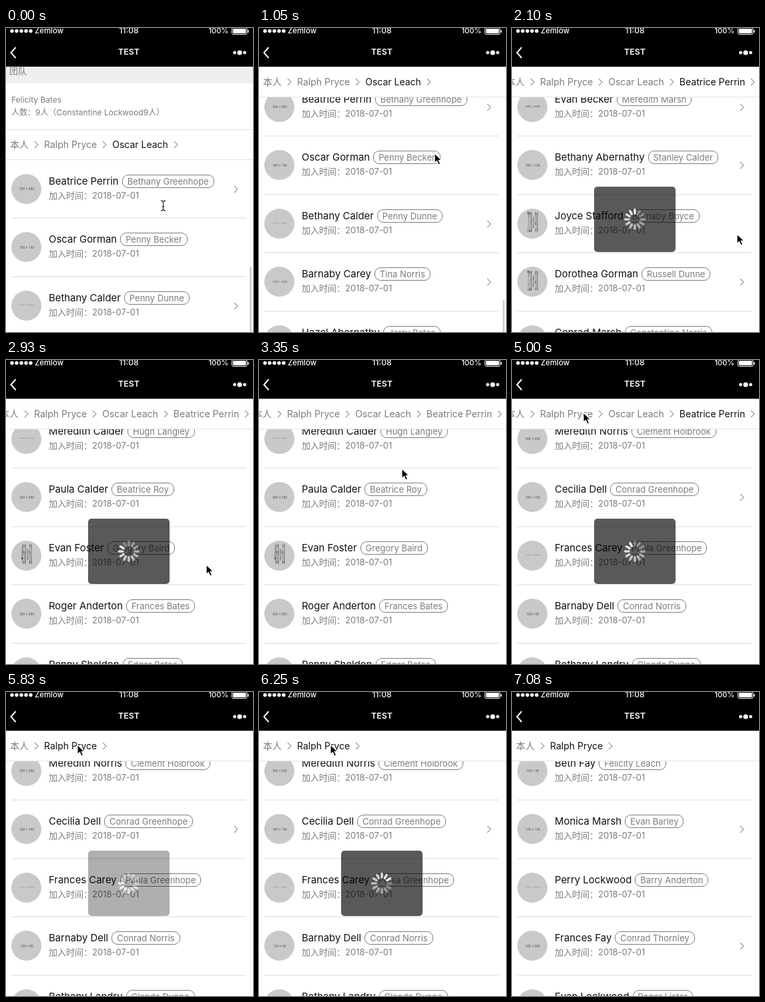
An HTML page for the animation above (7.5 s loop, 370x456 px).

```html
<!DOCTYPE html>
<html lang="zh-CN">
<head>
<meta charset="utf-8">
<style>
html, body { margin: 0; width: 100%; height: 100%; overflow: hidden; background: #fff; }
body { font-family: Inter, "Noto Sans CJK SC", "Noto Sans CJK JP", "Noto Sans CJK", sans-serif; color: #7c7c7c; }
#stage { position: relative; width: 370px; height: 456px; overflow: hidden; }
#stage div, #stage svg { position: absolute; box-sizing: border-box; white-space: nowrap; }
#stage .t { line-height: 20px; }
#page { left: 0; top: 0; width: 370px; height: 456px; }
#strip { left: 0; top: 40px; width: 370px; height: 43px; background: #efefef; }
#crumbs { left: 0; width: 370px; height: 46px; background: #fff; overflow: hidden;
  border-top: 1px solid #e3e3e3; border-bottom: 1px solid #e3e3e3; }
#path { left: 6px; top: 12px; display: flex; font-size: 14px; line-height: 20px; }
#stage #path svg { position: static; margin: 4px 8px 0; }
.on { color: #111; }
.row { left: 0; width: 370px; height: 87.5px; }
.rule { left: 8px; width: 351px; bottom: -1px; height: 2px; background: #ececec; }
.face { left: 8px; top: 21px; width: 45px; height: 45px; border-radius: 50%; overflow: hidden; background: #c9c9c9; }
.face div { left: 50%; top: 50%; font: 10px/12px Roboto, sans-serif; color: #555; }
.name { left: 64px; top: 22px; font-size: 14.9px; color: #111; }
.tag { display: inline-block; box-sizing: border-box; height: 20px; margin-left: 5px; padding: 0 7px;
  border: 1px solid #7c7c7c; border-radius: 9px; font-size: 13px; line-height: 18px; color: #7c7c7c; vertical-align: top; }
.date { left: 64px; top: 43px; font-size: 13px; }
#bar { left: 365px; width: 3px; height: 120px; border-radius: 2px; background: #d0d0d0; }
#toast { left: 123px; top: 238px; width: 122px; height: 98px; border-radius: 5px; background: rgba(0,0,0,.65); }
#head { left: 0; top: 0; }
</style>
</head>
<body>
<div id="stage">
  <div id="page">
    <div id="strip"></div>
    <div class="t" style="left:5px;top:54px;font-size:13px">团队</div>
    <div class="t" style="left:8px;top:98px;font-size:12px">Felicity Bates</div>
    <div class="t" style="left:8px;top:117px;font-size:12px">人数：9人（Constantine Lockwood9人）</div>
    <div id="list"></div>
  </div>
  <div id="crumbs"><div id="path"></div></div>
  <div id="bar"></div>
  <div id="toast"><svg id="spin" width="122" height="98" viewBox="-61 -49 122 98"></svg></div>
  <svg id="head" width="370" height="58" fill="#fff" font-weight="500">
    <rect width="370" height="58" fill="#000"/>
    <path d="M9 4.5H37.5" stroke="#fff" stroke-width="5.4" stroke-linecap="round" stroke-dasharray="0 7"/>
    <text x="43" y="8" font-size="11.4">Zemlow</text>
    <text x="184" y="8" font-size="12" text-anchor="middle">11:08</text>
    <text x="303.5" y="8" font-size="11">100%</text>
    <rect x="338.5" y="-.5" width="22.5" height="10" rx="2" fill="none" stroke="#fff"/>
    <rect x="340" y="1" width="19.5" height="7" rx="1"/>
    <rect x="362" y="3" width="1.6" height="4" rx=".8"/>
    <path d="M14.5 29L7.5 37L14.5 45" fill="none" stroke="#fff" stroke-width="2"/>
    <text x="184" y="40" font-size="12.4" font-weight="600" text-anchor="middle">TEST</text>
    <circle cx="342.5" cy="37" r="2.4"/><circle cx="350" cy="37" r="3.6"/><circle cx="357.5" cy="37" r="2.4"/>
  </svg>
  <svg id="arrow" width="16" height="22">
    <path d="M1 1V15.5L4.4 12.4L7 18L9.6 16.8L7.2 11.4H11.6Z" stroke="#fff" stroke-width="1.2"/>
  </svg>
  <svg id="beam" width="9" height="17" fill="none" stroke="#333" stroke-width="1.3">
    <path d="M1 1Q4.5 1 4.5 4V13Q4.5 16 1 16M8 1Q4.5 1 4.5 4V13Q4.5 16 8 16M3 10H6"/>
  </svg>
</div>
<script>
// The picture is held for one tick at a time; k counts ticks.
const LOOP = 7500, TICK = 208.1;
const SCROLL = 123, OVERFLOW = 15;
const $ = id => document.getElementById(id);
const clamp = v => Math.min(1, Math.max(0, v));

// person | tag | picture label | picture shape | has an arrow
const lists = [
  ["Beatrice Perrin|Bethany Greenhope|336 × 280||1", "Oscar Gorman|Penny Becker|180 × 150||",
   "Bethany Calder|Penny Dunne|160 × 600|line|1", "Barnaby Carey|Tina Norris|120 × 240|flat|1",
   "Hazel Abernathy|Jerry Bates|||"],
  ["Evan Becker|Meredith Marsh|240 × 400|flat|1", "Bethany Abernathy|Stanley Calder|180 × 150||1",
   "Joyce Stafford|Barnaby Boyce|728 × 90|tall|", "Dorothea Gorman|Russell Dunne|728 × 90|tall|1",
   "Conrad Marsh|Constantine Norris|||"],
  ["Meredith Calder|Hugh Langley|160 × 600|line|", "Paula Calder|Beatrice Roy|250 × 250||",
   "Evan Foster|Gregory Baird|468 × 60|tall|", "Roger Anderton|Frances Bates|336 × 280||",
   "Penny Sheldon|Edgar Bates|||"],
  ["Meredith Norris|Clement Holbrook|300 × 250||", "Cecilia Dell|Conrad Greenhope|180 × 150||1",
   "Frances Carey|Paula Greenhope|120 × 600|line|", "Barnaby Dell|Conrad Norris|120 × 90||",
   "Bethany Landry|Glenda Dunne|||"],
  ["Beth Fay|Felicity Leach|120 × 90||", "Monica Marsh|Evan Barley|125 × 125||1",
   "Perry Lockwood|Barry Anderton|160 × 600|line|", "Frances Fay|Conrad Thornley|336 × 280||1",
   "Evan Lockwood|Roger Lister|||"]
];
const shapes = { "": [.5, .5], flat: [.5, .36], line: [.5, .13], tall: [.42, 4.2] };
const people = ["本人", "Ralph Pryce", "Oscar Leach", "Beatrice Perrin"];

// Each click sets the trail, shows the loader for five ticks and swaps the list after three.
const clicks = [
  { k: 0, count: 3, active: 2 },
  { k: 7, count: 4, active: 3 },
  { k: 11, count: 4, active: -1 },
  { k: 21, count: 4, active: 3 },
  { k: 28, count: 2, active: 1 }
];
const loads = clicks.slice(1);
const loader = age => age < 0 || age > 4 ? 0 : age % 4 ? 1 : .48;

// Pointer stops: tick, x, y
const stops = [[3, 231, 258], [5, 262, 187], [7, 343, 117], [8, 343, 117], [10, 336, 308], [11, 342, 378],
  [13, 342, 378], [16, 213, 162], [19, 298, 80], [21, 125, 80], [22, 106, 78], [30, 106, 78], [33, 321, 423]];

function pointer(k) {
  const i = stops.findIndex(s => s[0] >= k);
  if (i < 1) return stops.at(i);
  const a = stops[i - 1], b = stops[i], p = (k - a[0]) / (b[0] - a[0]);
  return a.map((v, j) => v + (b[j] - v) * p);
}

const chevron = (style, color) => `<svg style="${style}" width="7" height="12" fill="none"
  stroke="${color}" stroke-width="1.1"><path d="M1 1L6 6L1 11"/></svg>`;

function row(text, i) {
  const [name, tag, label, shape, arrow] = text.split("|");
  return `<div class="row" style="top:${197.5 + 87.5 * i}px">
    <div class="face"><div style="transform:translate(-50%,-50%) scale(${shapes[shape]})">${label}</div></div>
    <div class="name t">${name}<span class="tag">${tag}</span></div>
    <div class="date t">加入时间：2018-07-01</div>
    ${arrow ? chevron("left:341px;top:38px", "#999") : ""}<div class="rule"></div></div>`;
}

const crumb = (name, i, active) =>
  `<span class="${i == active ? "on" : ""}">${name}</span>` + chevron("", "#999");

function fill(el, html) {
  if (el.last !== html) el.innerHTML = el.last = html;
}

function draw(now) {
  const k = Math.floor(now % LOOP / TICK);
  const { count, active } = clicks.findLast(c => c.k <= k);
  const p = clamp(k / 2), y = SCROLL * p * (2 - p);

  $("page").style.top = -y + "px";
  $("crumbs").style.top = Math.max(58, 152 - y) + "px";
  $("path").style.left = 6 - (count > 3 ? OVERFLOW * clamp((k - 8) / 2) : 0) + "px";
  fill($("path"), people.slice(0, count).map((name, i) => crumb(name, i, active)).join(""));
  fill($("list"), lists[loads.filter(c => k >= c.k + 3).length].map(row).join(""));

  $("bar").style.top = 358 + 50 * y / SCROLL + "px";
  $("bar").style.opacity = clamp((7 - k) / 2);

  $("toast").style.opacity = Math.max(...loads.map(c => loader(k - c.k)));
  const phase = Math.floor(k * 2.5);
  [...$("spin").children].forEach((s, i) =>
    s.setAttribute("opacity", .3 + .6 * ((i - phase + 120) % 12) / 11));

  const [, px, py] = pointer(k);
  const kind = k < 4 ? "beam" : k < 34 ? "arrow" : "";
  for (const id of ["arrow", "beam"]) {
    $(id).style.display = id == kind ? "block" : "none";
    $(id).style.left = px + "px";
    $(id).style.top = py + "px";
  }
  requestAnimationFrame(draw);
}

$("spin").innerHTML = Array.from({ length: 12 }, (_, i) =>
  `<path d="M0 -9V-14.5" transform="rotate(${i * 30})" stroke="#fff" stroke-width="3.4" stroke-linecap="round"/>`).join("");
draw(0);
</script>
</body>
</html>
```
